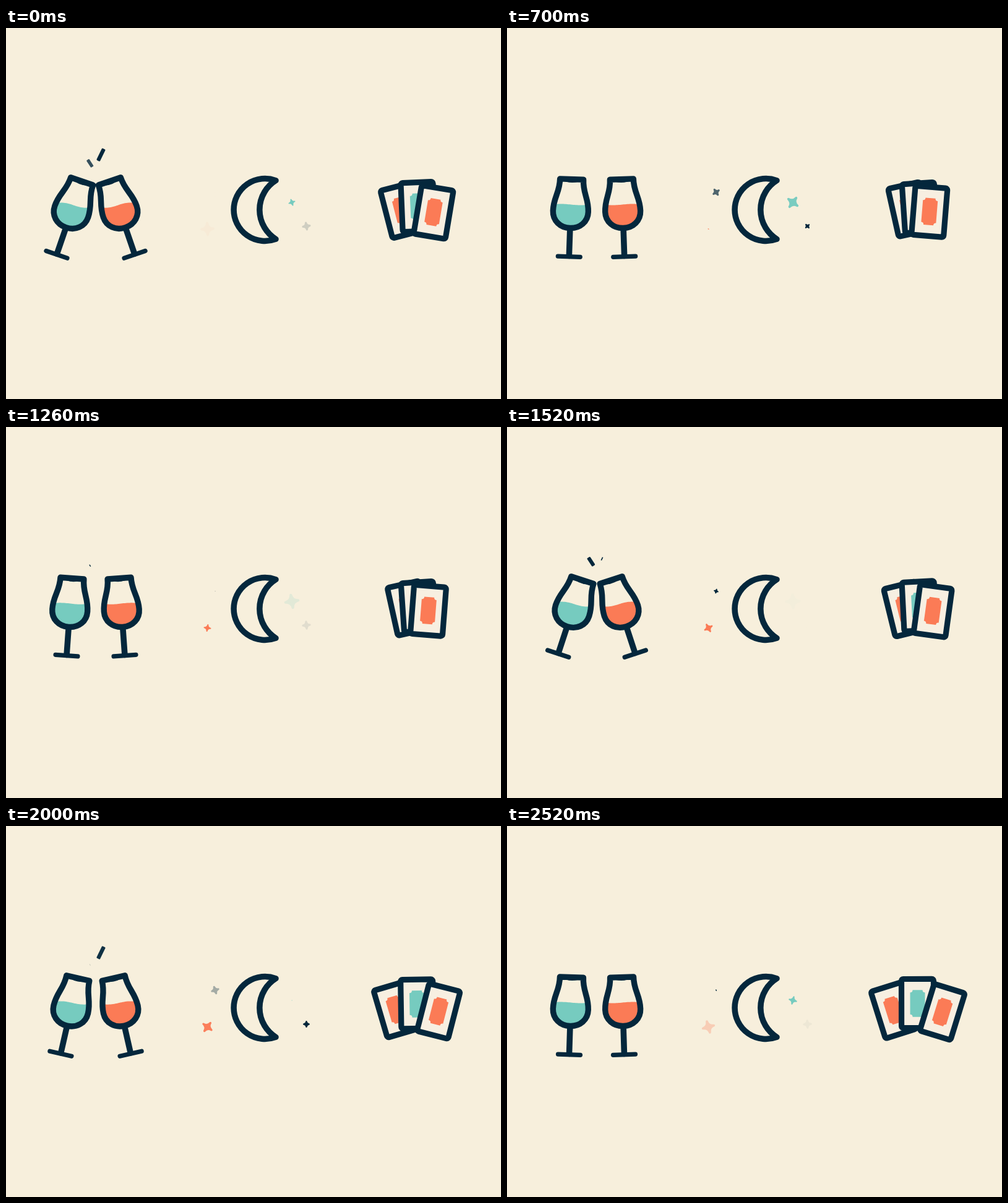
Recreate the animation shown at these times as an HTML page with a canvas. Size 800x600 px, loop 2.54 s.

```html
<!DOCTYPE html>
<html lang="en">
<head>
<meta charset="utf-8">
<title>Party icons</title>
<style>
  html, body { margin: 0; width: 100%; height: 100%; overflow: hidden; background: #f7efdc; }
  canvas { display: block; width: 800px; height: 600px; }
</style>
</head>
<body>
<canvas id="stage" width="800" height="600"></canvas>
<script>
const ctx = document.getElementById('stage').getContext('2d');
const LOOP = 2540;
const BG = '#f7efdc', NAVY = '#04273c', TEAL = '#76cbbf', ORANGE = '#fb7b56', PAPER = '#f7efe1';
const BEAT = 1800;
const BEAT_START = 1175;

const mod = (a, n) => ((a % n) + n) % n;
const mix = (a, b, k) => a + (b - a) * k;
const rad = deg => deg * Math.PI / 180;
const channels = hex => [1, 3, 5].map(i => parseInt(hex.slice(i, i + 2), 16));

// Colour as it looks at the given opacity on the background.
function tint(color, alpha) {
  const back = channels(BG);
  return `rgb(${channels(color).map((c, i) => Math.round(mix(back[i], c, alpha)))})`;
}

// cubic-bezier(.25, .1, .25, 1)
function ease(x) {
  if (x <= 0) return 0;
  if (x >= 1) return 1;
  const bez = (a, b, s) => 3 * a * s * (1 - s) ** 2 + 3 * b * s * s * (1 - s) + s ** 3;
  let lo = 0, hi = 1;
  for (let i = 0; i < 24; i++) {
    const mid = (lo + hi) / 2;
    if (bez(0.25, 0.25, mid) < x) lo = mid; else hi = mid;
  }
  return bez(0.1, 1, lo);
}

function at(x, y, deg, draw) {
  ctx.save();
  ctx.translate(x, y);
  ctx.rotate(rad(deg));
  draw();
  ctx.restore();
}

function stroke(width, path) {
  ctx.strokeStyle = NAVY;
  ctx.lineWidth = width;
  path ? ctx.stroke(path) : ctx.stroke();
}

const bowl = new Path2D('M-19-62C-18.5-40-28.5-32-28.5-10C-28.5 6-16 17 0 17C16 17 28.5 6 28.5-10C28.5-32 18.5-40 19-62Z');
const rim = new Path2D('M-19-62Q0-51 19-62Z');
const stem = new Path2D('M0 18V62');
const foot = new Path2D('M-18 63.3H18');
const moon = new Path2D('M436 246.6A50.5 50.5 0 1 0 436 341.4A56 56 0 0 1 436 246.6Z');

function drawLiquid(tilt, color) {
  ctx.save();
  ctx.clip(bowl);
  const slope = Math.tan(rad(tilt * tilt / 60 - tilt));
  const swell = 0.8 + tilt * 0.08;
  ctx.beginPath();
  ctx.moveTo(-34, 30);
  for (let x = -34; x <= 34; x += 2) {
    ctx.lineTo(x, -21 + x * slope + swell * Math.sin(x * Math.PI / 32));
  }
  ctx.lineTo(34, 30);
  ctx.fillStyle = color;
  ctx.fill();
  ctx.restore();
}

function drawGlass(tilt, color, mirrored) {
  ctx.save();
  if (mirrored) {
    ctx.translate(290, 0);
    ctx.scale(-1, 1);
  }
  at(102.5, 306.5, tilt, () => {
    drawLiquid(tilt, color);
    stroke(9.4, bowl);
    ctx.fillStyle = NAVY;
    ctx.fill(rim);
    stroke(9.6, stem);
    stroke(7.2, foot);
  });
  ctx.restore();
}

function drawGlasses(t) {
  const u = mod(t - BEAT_START, BEAT) / BEAT;
  const tilt = 20 * (u < 0.3 ? ease(u / 0.3) : 1 - ease((u - 0.3) / 0.7));
  drawGlass(tilt, TEAL, false);
  drawGlass(tilt, ORANGE, true);
}

// Grows from its bottom edge, then shrinks back while fading.
function drawSpark(t, { x, bottom, rise, length, angle, delay }) {
  const u = mod(t - BEAT_START - delay, BEAT) / BEAT;
  const fade = 1 - ease((u - 0.3) / 0.3);
  const scale = u < 0.3 ? ease(u / 0.3) : fade;
  if (scale < 0.01) return;
  ctx.save();
  ctx.translate(x, bottom);
  ctx.scale(scale, scale);
  at(0, -rise, angle, () => {
    ctx.beginPath();
    ctx.roundRect(-3.3, -length / 2, 6.6, length, 1.5);
    ctx.fillStyle = tint(NAVY, fade);
    ctx.fill();
  });
  ctx.restore();
}

const sparks = [
  { x: 135.8, bottom: 226, rise: 9.1, length: 17.4, angle: -33, delay: 0 },
  { x: 153.5, bottom: 216, rise: 11.7, length: 22.8, angle: 26, delay: 250 }
];

// Spins outwards, slowing down, and fades over the last part of its life.
function drawStar(t, { x, y, radius, color, weight, period, start }) {
  const u = mod(t - start, period) / period;
  const grow = 1 - (1 - u) ** 3;
  const r = radius * grow;
  at(x, y, 360 * grow, () => {
    const tip = r * (1 - weight / 2);
    const waist = r * 0.12;
    ctx.beginPath();
    ctx.moveTo(tip, 0);
    for (let i = 1; i <= 4; i++) {
      const half = (i - 0.5) * Math.PI / 2, end = i * Math.PI / 2;
      ctx.quadraticCurveTo(waist * Math.cos(half), waist * Math.sin(half),
        tip * Math.cos(end), tip * Math.sin(end));
    }
    ctx.closePath();
    ctx.fillStyle = ctx.strokeStyle = tint(color, 1 - ease((u - 0.45) / 0.47));
    ctx.lineWidth = r * weight;
    ctx.fill();
    ctx.stroke();
  });
}

const stars = [
  { x: 338, y: 265.5, radius: 7.3, color: NAVY, weight: 0.46, period: 1200, start: 45 },
  { x: 485.5, y: 320.5, radius: 7.3, color: NAVY, weight: 0.46, period: 1200, start: 360 },
  { x: 462, y: 282, radius: 12.8, color: TEAL, weight: 0.34, period: 2400, start: -430 },
  { x: 325.5, y: 325, radius: 11.5, color: ORANGE, weight: 0.34, period: 2950, start: 610 }
];

function drawTicket(color) {
  const w = 12, h = 21.8, r = 4;
  ctx.beginPath();
  ctx.arc(-w, -h, r, Math.PI / 2, 0, true);
  ctx.arc(w, -h, r, Math.PI, Math.PI / 2, true);
  ctx.arc(w, h, r, -Math.PI / 2, Math.PI, true);
  ctx.arc(-w, h, r, 0, -Math.PI / 2, true);
  ctx.closePath();
  ctx.fillStyle = color;
  ctx.fill();
}

function drawCard(x, y, angle, color) {
  const edge = new Path2D();
  edge.roundRect(-26, -39.6, 52, 79.2, 3);
  at(x, y, angle, () => {
    ctx.fillStyle = PAPER;
    ctx.fill(edge);
    drawTicket(color);
    stroke(9.2, edge);
  });
}

function drawCards(t) {
  const phase = mod(t - BEAT_START, 2 * BEAT) / BEAT;
  const open = phase < 1 ? ease(phase) : 1 - ease(phase - 1);
  const swing = mix(4, 17.7, open);
  drawCard(mix(651, 623.5, open), mix(293, 298.3, open), mix(-12.3, -17.7, open), ORANGE);
  drawCard(mix(667, 663.4, open), mix(290.7, 286.9, open), mix(-4, 0.1, open), TEAL);
  drawCard(675 + 97 * Math.sin(rad(swing)), 393.5 - 97 * Math.cos(rad(swing)), swing, ORANGE);
}

function render() {
  const t = performance.now() % LOOP;
  ctx.fillStyle = BG;
  ctx.fillRect(0, 0, 800, 600);
  ctx.lineJoin = ctx.lineCap = 'round';
  sparks.forEach(s => drawSpark(t, s));
  drawGlasses(t);
  stars.forEach(s => drawStar(t, s));
  stroke(9.5, moon);
  drawCards(t);
  requestAnimationFrame(render);
}
render();
</script>
</body>
</html>
```
